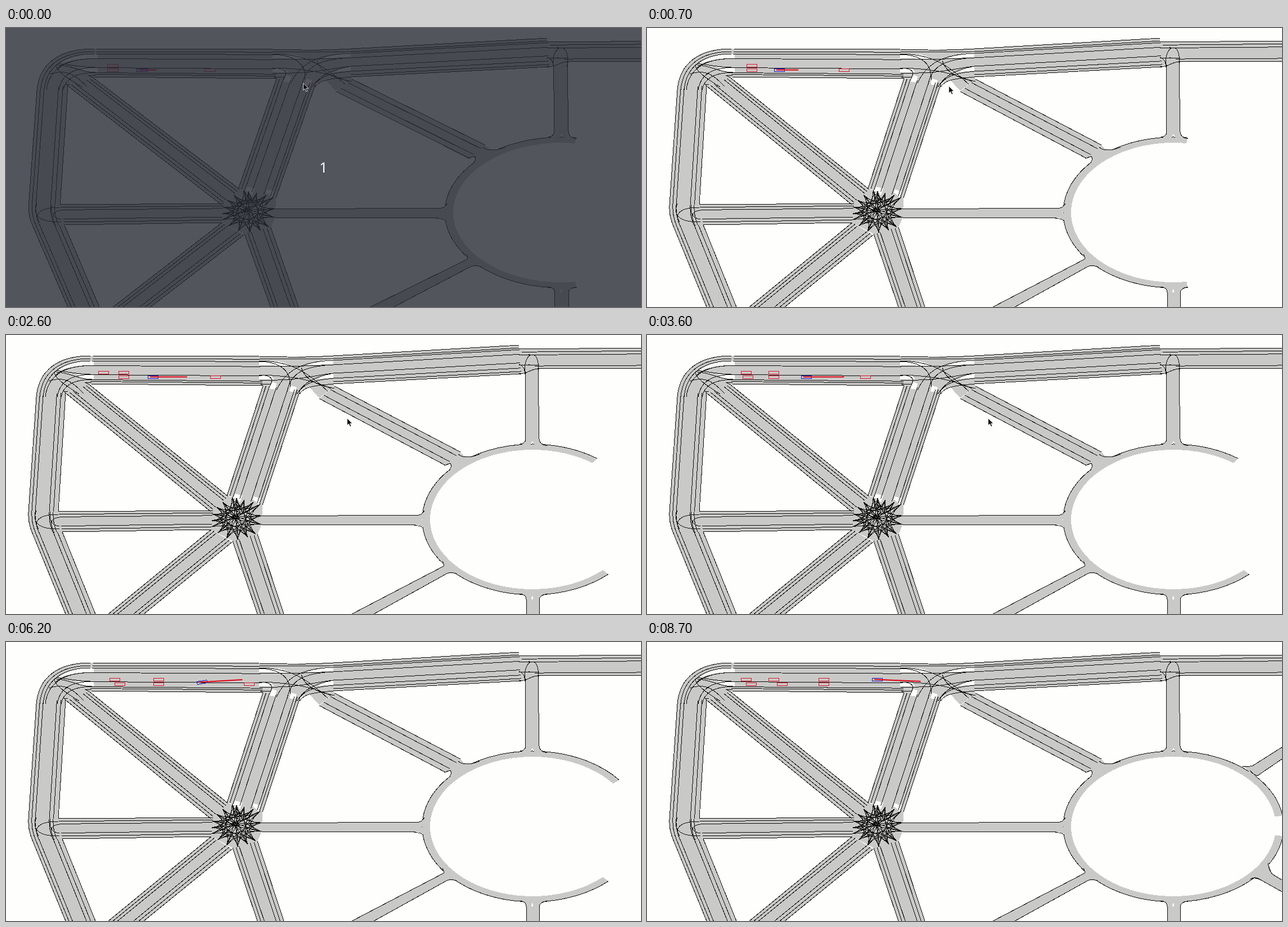
An HTML page that plays this animation: 1129x496 px, repeating every 8800 ms.

```html
<!DOCTYPE html>
<html lang="en">
<head>
<meta charset="utf-8">
<title>Lane change on a road map</title>
<style>
  html, body { margin: 0; width: 100%; height: 100%; overflow: hidden; background: #fefefc; }
  svg { display: block; width: 1129px; height: 496px; }
  #map { shape-rendering: crispEdges; }
  #map path { vector-effect: non-scaling-stroke; stroke-width: 1px; fill: none; }
  #map .road { fill: #c9cac7; }
  #map .gap { fill: #fefefc; }
  .line { stroke: #0c0c0c; }
  .car { stroke: #e0102c; }
  .ego { stroke: #1414c8; }
  #map #plan { stroke: #e00010; stroke-width: 2px; shape-rendering: auto; }
  text { font: 25px "Noto Sans", "Open Sans", sans-serif; fill: #fff; text-anchor: middle; }
</style>
</head>
<body>
<svg viewBox="0 0 1129 496">
  <g id="map"></g>
  <g id="countdown">
    <rect width="1129" height="496" fill="#272b34" fill-opacity=".8"/>
    <text x="564.5" y="257">1</text>
  </g>
  <path id="cursor" d="M0 0V12.5L3 10 5.2 15 7.4 14 5.3 9.3H9.2Z" fill="#111" stroke="#fff" stroke-width=".8"/>
</svg>
<script>
const map = document.getElementById('map');
const countdown = document.getElementById('countdown');
const cursor = document.getElementById('cursor');

function add(cls, d = '') {
  const path = document.createElementNS('http://www.w3.org/2000/svg', 'path');
  path.setAttribute('class', cls);
  path.setAttribute('d', d);
  return map.appendChild(path);
}
const mix = (a, b, f) => a + (b - a) * f;
const show = (el, on) => el.style.display = on ? '' : 'none';

// The roundabout sits below all other roads.
const ringFill = add('road'), ringLine = add('line');
const lines = [];
const fill = d => add('road', d + 'Z');
const draw = (...paths) => lines.push(...paths);

// A road between two edges (a-b and c-d) with lane lines at fractions of its width.
function roadLines(ax, ay, bx, by, cx, cy, dx, dy, lanes = [0, 1]) {
  return lanes.map(f => `M${mix(ax, cx, f)} ${mix(ay, cy, f)}L${mix(bx, dx, f)} ${mix(by, dy, f)}`).join('');
}
function road(...r) {
  fill(`M${r[0]} ${r[1]}L${r[2]} ${r[3]} ${r[6]} ${r[7]} ${r[4]} ${r[5]}`);
  draw(roadLines(...r));
}
const six = [0, .13, .26, .71, .86, 1];

// Junction surfaces
fill('M150 37C95 37 62 55 54 110L106 104 148 88 156 87V37');
fill('M40 315Q38 330 46 350L100 350 93 314');
fill('M364 314L395 287 425 292 456 302 455 337 447 354 403 366 365 346');
fill('M450 38L500 39 582 37V87L545 90 523 98 457 90');
fill('M540 80L582 84 584 91 557 112 535 88');
fill('M911 25L948 25V65L923 66 912 68');
fill('M924 185Q923 193 914 197L930 201 936 188 943 201 962 197Q950 195 948 185');
fill('M728 321Q740 321 744 312L750 328 738 328.5 750 330 742 343Q738 337 728 337');
fill('M782 232L808 208 812 213Q820 219 836 216L800 242 790 239Q793 233 788 230');
fill('M778 411L777 404 802 424 784 424');
fill('M912 459L962 459Q948 462 948 472L938 472 936 463 933 472H925Q925 462 912 459');

// Roads
road(150, 37, 450, 38, 150, 87, 457, 90, [0, .1, .18, .35, .67, .85, .91, 1]);
road(54, 110, 40, 315, 106, 102, 93, 314, [0, .11, .23, .7, .84, 1]);
road(46, 350, 106, 496, 100, 350, 159, 496, [0, .11, .23, .7, .84, 1]);
road(93, 314, 368, 312, 100, 350, 365, 346, six);
road(148, 88, 395, 287, 107, 104, 364, 314, six);
road(365, 346, 182, 496, 402, 368, 245, 496, six);
road(403, 366, 447, 496, 447, 354, 494, 496, six);
road(457, 90, 393, 285, 523, 98, 456, 302, [0, .08, .17, .36, .67, .85, .92, 1]);
road(582, 37, 912, 18, 582, 87, 916, 69, [0, .1, .16, .32, .62, .8, .92, 1]);
road(912, 25, 1129, 23, 945, 60, 1129, 59, [0, .15, .3, .86, 1]);
road(923, 65, 924, 185, 946, 65, 948, 185);
road(455, 321.5, 728, 320.5, 455, 337, 728, 337);
road(584, 91, 808, 208, 557, 113, 782, 232, [0, .27, .72, 1]);
road(778, 411, 615, 496, 784, 424, 654, 496);
road(925, 470, 925, 496, 948, 470, 948, 496);

// Unpaved lane ends
add('gap', `M156 46Q115 45 92 64Q115 54 156 54ZM156 71L124 70Q130 78 145 79H156Z
  M450 47H485Q500 50 505 55L450 54ZM450 71h18q8 4 8 8H450Z
  M582 43V51L535 54Q550 46 582 43ZM582 69V76L555 78Q565 70 582 69Z
  M471 83L481 86 479 97 467 95ZM507 90L517 93 513 102 504 100Z
  M407 282l13 3-4 13q-4-8-12-8ZM440 287l13 3-5 12q-3-7-9-9Z`);

// Bends on the left
for (const [y, x] of [[37, 54], [42, 60], [46, 66], [54.5, 70], [70.5, 91], [79.5, 98]])
  draw(`M150 ${y}C${mix(150, x, .6)} ${y} ${x + 4} ${mix(110, y, .65)} ${x} 110`);
for (const x of [40, 46, 52, 77, 84])
  draw(`M${x} 315Q${x - 1} 333 ${x + 6} 350`);
draw('M93 319C60 319 48 330 58 345M95 345C60 345 45 335 54 312',
  'M95 324C75 326 80 340 86 352M95 340C75 338 78 320 79 314',
  'M150 70C110 69 85 58 86 68C90 80 110 92 130 105M156 79C130 80 112 66 90 66',
  'M138 104C120 85 105 72 76 82M150 54C120 55 98 62 88 72M148 88L140 84H152M107 104L103 100 110 101');

// Top junction
draw('M450 38L500 39Q540 40 582 37M450 42Q530 44 582 42',
  'M450 46C505 46 535 65 572 100M450 55C500 56 530 56 582 53',
  'M582 45C530 47 498 60 481 98M582 53C535 55 506 65 500 100M450 47C490 48 507 65 505 92',
  'M450 71C480 72 474 82 467 95M450 71C500 72 540 78 578 95M450 80C520 82 545 72 582 68',
  'M582 68C545 75 530 85 517 105M582 77C550 80 535 84 523 98M582 87C555 90 530 90 522 105',
  'M525 58C530 75 545 88 584 95M457 90L452 87H470');

// Right-hand junction and roundabout mouths
draw('M923 70C920 52 926 35 936 35C945 35 948 50 946 70M912 52C920 55 922 60 923 70',
  'M912 68C930 70 930 60 948 60M912 36Q930 34 948 36M912 54Q930 52 948 54',
  'M924 185Q923 193 914 194M948 185Q949 195 962 197',
  'M728 320.5Q740 321 744 312M726 339Q738 338 741 343',
  'M804 212Q816 222 842 212M779 232L790 228Q794 233 788 240',
  'M778 411Q779 406 776 402M784 424L790 422Q798 423 802 425',
  'M912 460Q925 461 925 470M962 461Q948 462 948 472');

// Star-shaped crossing: every port is joined to several others through the middle.
const ports = [[366, 318], [366, 330], [365, 341], [376, 352], [392, 362], [412, 364], [430, 360], [444, 354],
  [455, 337], [455, 321], [452, 301], [440, 297], [424, 293], [410, 290], [402, 288], [385, 297], [374, 306]];
ports.forEach(([x, y], i) => {
  for (const step of [3, 5, 8]) {
    const [u, v] = ports[(i + step) % ports.length];
    draw(`M${x} ${y}Q${mix((x + u) / 2, 410, .75)} ${mix((y + v) / 2, 328, .75)} ${u} ${v}`);
  }
});
add('line', lines.join(''));

// Parts revealed later
function reveal(at, fillPath, linePath) {
  return [add('road', fillPath), add('line', linePath)].map(el => ({ el, at }));
}
const late = [
  ...reveal(7, 'M1060 219Q1072 221 1076 221L1129 187V208L1085 238 1080 241Z',
    'M1058 222Q1070 222 1077 220L1129 187M1072 228Q1078 236 1085 238L1129 208'),
  ...reveal(6.3, 'M1072 420L1082 412 1100 418 1094 424 1086 420Z', 'M1072 422Q1080 417 1094 424'),
  ...reveal(7.6, 'M1105 392L1112 413 1129 423V444L1086 420 1076 419Z',
    'M1104 393Q1106 406 1112 413L1129 423M1072 422Q1080 417 1086 420L1129 444')
];

function ringPoint(degrees, rx, ry) {
  const a = degrees * Math.PI / 180;
  return `${936 + rx * Math.cos(a)} ${328 + ry * Math.sin(a)}`;
}
function drawRing(top, bottom) {
  const outer = `M${ringPoint(top, 196, 134)}A196 134 0 1 0 ${ringPoint(bottom, 196, 134)}`;
  ringLine.setAttribute('d', outer);
  ringFill.setAttribute('d', `${outer}L${ringPoint(bottom, 182, 124)}A182 124 0 1 1 ${ringPoint(top, 182, 124)}Z`);
}

// Smooth curve through [time, value] keys.
function track(keys, t) {
  let i = 0;
  while (i < keys.length - 2 && t >= keys[i + 1][0]) i++;
  const slope = k => {
    const a = keys[Math.max(k - 1, 0)], b = keys[Math.min(k + 1, keys.length - 1)];
    return (b[1] - a[1]) / (b[0] - a[0]);
  };
  const [t0, v0] = keys[i], [t1, v1] = keys[i + 1];
  const h = t1 - t0, u = (t - t0) / h;
  return v0 + (v1 - v0) * u * u * (3 - 2 * u) + h * u * (1 - u) * (slope(i) * (1 - u) - slope(i + 1) * u);
}
function ease(from, to, t) {
  const u = Math.min(1, Math.max(0, (t - from) / (to - from)));
  return u * u * (3 - 2 * u);
}

const upper = 66.5, lower = 74.5, box = 'M-9-2.5H9V2.5H-9Z';
const pair = [[0, 182], [.2, 182.6], [1.7, 197], [3.6, 225], [5, 249.5], [7.2, 289], [8.8, 316.5]];
const cars = [
  [upper, pair],
  [lower, pair],
  [upper, [[2.2, 173], [3.6, 176], [5, 182.5], [7.2, 204], [8.8, 227]]],
  [lower, [[2.7, 174], [3.6, 179.5], [5, 189.5], [7.2, 215], [8.8, 242]]],
  [upper, [[7.7, 173.5], [8.8, 176.3]]],
  [lower, [[6.4, 174], [7.2, 177], [8.8, 185.7]]],
  [lower, [[0, 345], [.2, 345.8], [1.7, 360], [3.6, 388], [5, 413], [7.2, 449], [7.9, 461]]]
].map(([y, keys]) => ({ y, keys, el: add('car', box) }));

const egoKeys = [[0, 231], [.2, 231.8], [1.7, 245.5], [3.6, 283], [5, 317.5], [7.2, 374.5], [8.8, 412]];
const planKeys = [[0, 255], [.2, 256.4], [1.7, 297], [3.6, 350], [5, 388], [7.2, 447], [8.8, 489]];
const egoY = t => lower - 8 * ease(5, 7.9, t);
const ego = add('ego', box);
const plan = add('plan');
plan.id = 'plan';

function render(t) {
  map.setAttribute('transform', t < .7 ? 'matrix(1.057 0 0 1 -2 0)' : '');
  show(countdown, t < .2);

  drawRing(t < 1.4 ? -82.7 : t < 5.3 ? -54 : t < 7 ? -38 : -8.2,
    t < 1.4 ? 82.6 : t < 6.3 ? 46.5 : t < 8.3 ? 31.5 : 7.3);
  for (const { el, at } of late) show(el, t >= at);

  for (const { el, y, keys } of cars) {
    const on = t >= keys[0][0] && t < keys[keys.length - 1][0];
    show(el, on);
    if (on) el.setAttribute('transform', `translate(${track(keys, t)} ${y})`);
  }

  const x = track(egoKeys, t), y = egoY(t);
  const angle = Math.atan2(egoY(t + .1) - egoY(t - .1), 5) * 180 / Math.PI;
  ego.setAttribute('transform', `translate(${x} ${y}) rotate(${angle})`);
  const endY = lower - 7.5 * ease(4.6, 4.9, t) + 3 * ease(7.6, 8.7, t);
  plan.setAttribute('d', `M${x - 5.5} ${y}L${track(planKeys, t)} ${endY}`);

  const move = ease(.6, 1.1, t), leave = ease(3.7, 4.2, t);
  const mouseX = 528.5 + 78 * move - 594 * leave + 14 * ease(4.2, 4.4, t);
  cursor.setAttribute('transform', `translate(${mouseX} ${98 + 50 * move - 139 * leave})`);
  show(cursor, t < 4.7);
}

const start = performance.now();
function frame() {
  const ms = (performance.now() - start) % 8800;
  render(Math.floor(ms / 100) / 10);
  requestAnimationFrame(frame);
}
frame();
</script>
</body>
</html>
```
